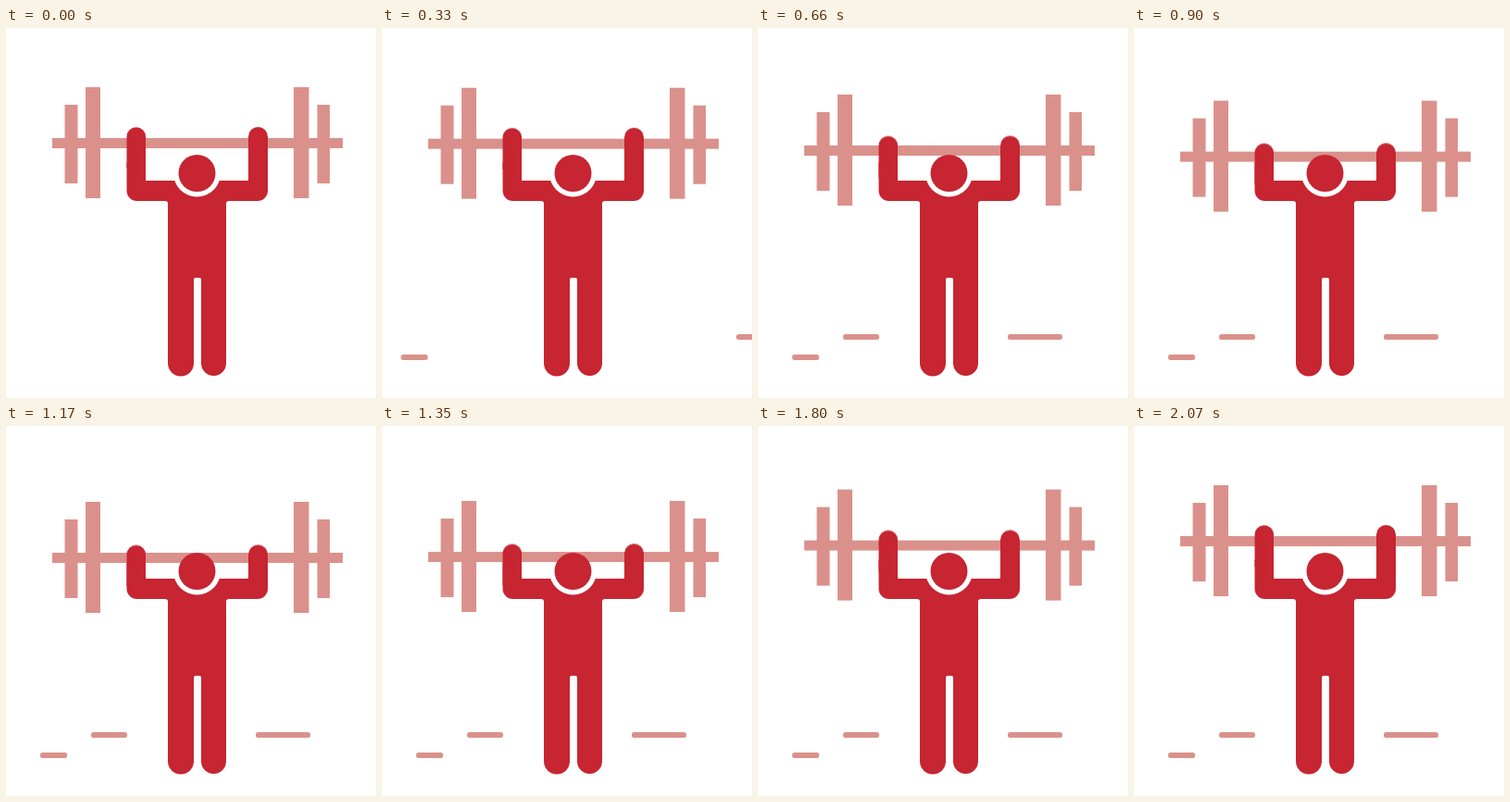
An HTML page for the animation above (2100 ms loop, 400x400 px).

```html
<!DOCTYPE html>
<html lang="en">
<head>
<meta charset="utf-8">
<title>Weight lifter</title>
<style>
  html, body { margin: 0; width: 100%; height: 100%; overflow: hidden; background: #fff; }
  svg { display: block; width: 100vw; height: 100vh; }

  .body { fill: #c62531; }
  .pale { fill: #da918b; }

  .barbell, .hands, .dash { animation: 2100ms linear infinite both; }
  .barbell { --drop: 18px; animation-name: press; }
  .hands { --drop: 21.5px; animation-name: press; }

  @keyframes press {
    0%, 10% { transform: translateY(0); animation-timing-function: cubic-bezier(.37, 0, .63, 1); }
    56.2%, 58% { transform: translateY(var(--drop)); animation-timing-function: cubic-bezier(.37, 0, .63, 1); }
    100% { transform: translateY(0); }
  }

  /* Floor dashes slide in one after another, then vanish when the loop restarts. */
  .near { --from: -67px; animation-name: slide-near; }
  .right { --from: 131px; animation-name: slide-right; }
  .left { --from: -132px; animation-name: slide-left; }

  @keyframes slide-near {
    0%, 10% { transform: translateX(var(--from)); animation-timing-function: cubic-bezier(.5, 1, .89, 1); }
    21.43%, 100% { transform: none; }
  }
  @keyframes slide-right {
    0%, 14.76% { transform: translateX(var(--from)); animation-timing-function: cubic-bezier(.5, 1, .89, 1); }
    29.05%, 100% { transform: none; }
  }
  @keyframes slide-left {
    0%, 15.95% { transform: translateX(var(--from)); animation-timing-function: cubic-bezier(.5, 1, .89, 1); }
    30.24%, 100% { transform: none; }
  }
</style>
</head>
<body>
<svg viewBox="0 0 400 400">
  <g class="pale">
    <rect class="dash near" x="37" y="353" width="29" height="6" rx="2.5"/>
    <rect class="dash left" x="92" y="331" width="39" height="6" rx="2.5"/>
    <rect class="dash right" x="270" y="331" width="59" height="6" rx="2.5"/>
  </g>

  <!-- shoulders, torso and legs -->
  <path class="body" d="M130.5 145H151V165H262V145H283V176
    a11 11 0 0 1 -11 11H241q-3 0 -3 3V362.5a13.5 13.5 0 0 1 -27 0V272
    q0 -2 -2 -2h-4q-2 0 -2 2V362.5a14 14 0 0 1 -28 0V190q0 -3 -3 -3H141.5
    a11 11 0 0 1 -11 -11Z"/>
  <circle cx="206.5" cy="157" r="25.5" fill="#fff"/>

  <g class="barbell pale">
    <rect x="50" y="119" width="314" height="11"/>
    <rect x="63.5" y="83" width="14" height="85"/>
    <rect x="86" y="64" width="16" height="120"/>
    <rect x="311" y="64" width="16.5" height="120"/>
    <rect x="336.5" y="83" width="13.5" height="85"/>
  </g>

  <g class="body">
    <circle cx="206.5" cy="157" r="20"/>
    <g class="hands">
      <path d="M130.5 152V117.5a10.25 10.25 0 0 1 20.5 0V152Z"/>
      <path d="M262 152V117.5a10.5 10.5 0 0 1 21 0V152Z"/>
    </g>
  </g>
</svg>
</body>
</html>
```
